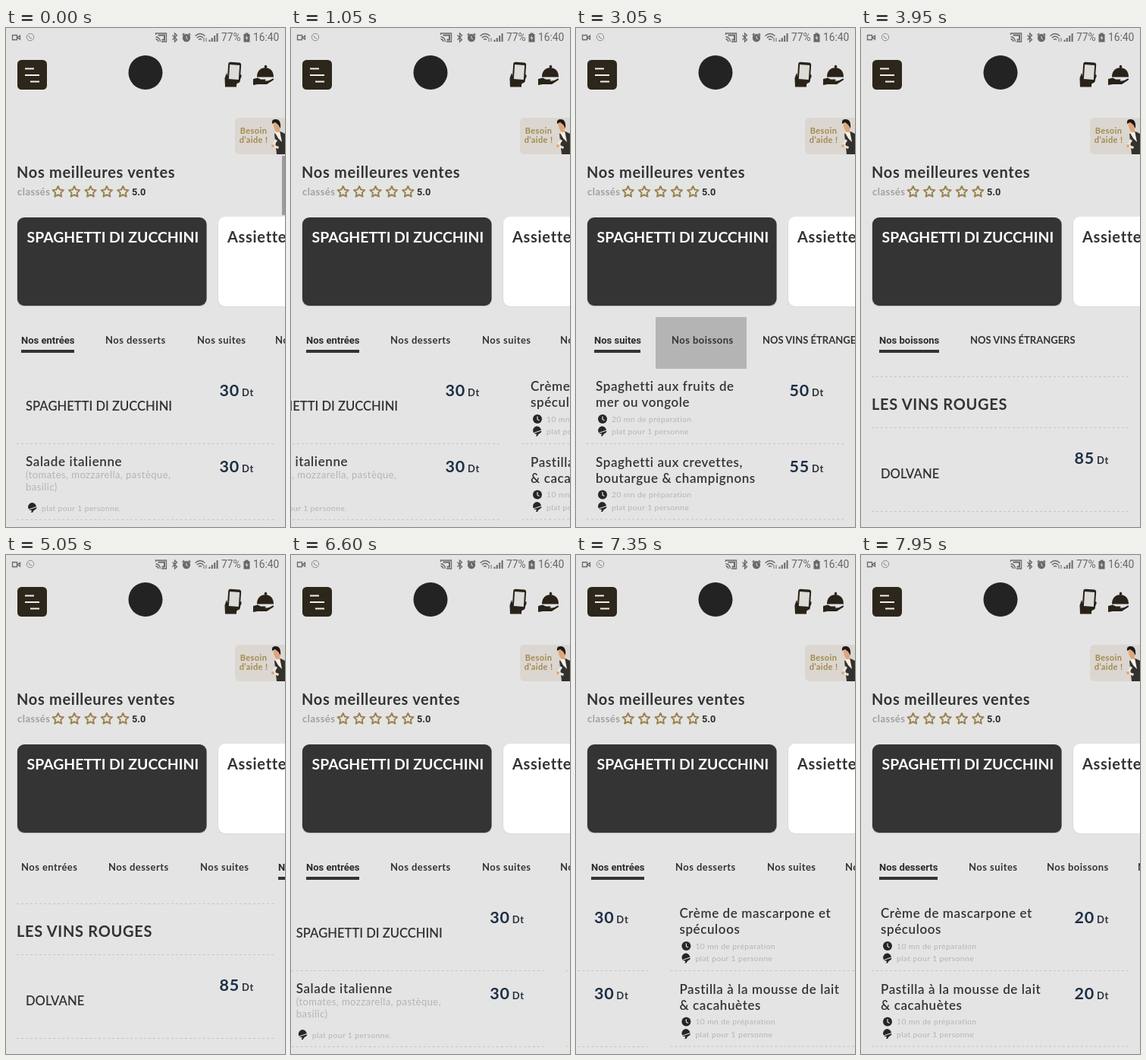
These frames come from a looping animation (368x656 px, 8 s). An HTML page:

```html
<!DOCTYPE html>
<html lang="fr">
<head>
<meta charset="utf-8">
<title>Menu du restaurant</title>
<style>
html, body { margin: 0; width: 100%; height: 100%; overflow: hidden; background: #e4e4e4; }
svg { display: block; width: 368px; height: 656px; }
text { font-family: Lato, "Open Sans", sans-serif; font-weight: 600; letter-spacing: .035em; fill: #333; }
.bold { font-weight: 700; }
.caps { letter-spacing: 0; }
.sys { font-family: Roboto, sans-serif; font-weight: 400; letter-spacing: 0; fill: #666; }
.on { font-family: Roboto, sans-serif; font-weight: 700; letter-spacing: 0; fill: #2b2b2b; }
.soft { fill: #b4b4b4; font-weight: 400; }
.price { fill: #1c2f45; font-weight: 700; }
.unit { fill: #2c333c; }
.gold { fill: #a08a50; font-weight: 700; }
.white { fill: #fff; }
.dash { stroke: #c5c5c5; stroke-dasharray: 3 3; }

#bar, #strip, #pages, .set, .ripple { animation: 8s linear infinite; }
#bar { animation-name: bar; }
#strip { animation-name: strip; }
#pages { animation-name: pages; }
.set { animation-timing-function: step-end; visibility: hidden; }
#set0 { animation-name: set0; }
#set1 { animation-name: set1; }
#set2 { animation-name: set2; }
#set3 { animation-name: set3; }
.ripple { transform-box: fill-box; transform-origin: center; opacity: 0; }
#press3 { animation-name: press3; }
#press0 { animation-name: press0; }

@keyframes bar { 0%, .625% { opacity: 1; } 6.875%, 100% { opacity: 0; } }
@keyframes strip {
  0%, 15.625% { transform: translateX(20px); animation-timing-function: ease-out; }
  18.125%, 27.5% { transform: translateX(-91px); animation-timing-function: ease-out; }
  30.625%, 40.625% { transform: translateX(-212px); animation-timing-function: ease-out; }
  43.75%, 54.8% { transform: translateX(-315px); animation-timing-function: ease-out; }
  59.375%, 93.125% { transform: translateX(20px); animation-timing-function: ease-out; }
  96.875%, 100% { transform: translateX(-91px); }
}
@keyframes pages {
  0%, 11.5% { transform: translateX(0); }
  12.5% { transform: translateX(-24px); }
  13.75% { transform: translateX(-130px); }
  15% { transform: translateX(-265px); }
  16.25% { transform: translateX(-342px); }
  17.5%, 20.7% { transform: translateX(-368px); }
  23.75% { transform: translateX(-440px); }
  25.625% { transform: translateX(-550px); }
  27.5% { transform: translateX(-680px); }
  29.6%, 39.8% { transform: translateX(-736px); animation-timing-function: ease-out; }
  43.75%, 70% { transform: translateX(-1104px); animation-timing-function: ease-in-out; }
  74.6%, 80.3% { transform: translateX(0); }
  82.5% { transform: translateX(-19px); }
  87.5% { transform: translateX(-125px); }
  90.625% { transform: translateX(-200px); animation-timing-function: ease-out; }
  96.25%, 100% { transform: translateX(-368px); }
}
@keyframes set0 {
  0% { visibility: visible; } 15.625% { visibility: hidden; }
  70% { visibility: visible; } 93.125%, 100% { visibility: hidden; }
}
@keyframes set1 {
  0% { visibility: hidden; } 15.625% { visibility: visible; }
  27.5% { visibility: hidden; } 93.125%, 100% { visibility: visible; }
}
@keyframes set2 {
  0% { visibility: hidden; } 27.5% { visibility: visible; } 40.625%, 100% { visibility: hidden; }
}
@keyframes set3 {
  0% { visibility: hidden; } 40.625% { visibility: visible; } 70%, 100% { visibility: hidden; }
}
@keyframes press3 {
  0%, 33.5% { opacity: 0; transform: scale(.15); }
  34% { opacity: .21; transform: scale(.2); }
  37.5%, 40% { opacity: .21; transform: scale(1); }
  42.5%, 100% { opacity: 0; transform: scale(1); }
}
@keyframes press0 {
  0%, 65.6% { opacity: 0; transform: scale(.15); }
  66% { opacity: .21; transform: scale(.2); }
  69%, 70% { opacity: .21; transform: scale(1); }
  72.5%, 100% { opacity: 0; transform: scale(1); }
}
</style>
</head>
<body>
<svg viewBox="0 0 368 656">
  <defs>
    <clipPath id="cell3"><rect x="317" y="380" width="120" height="68"/></clipPath>
    <clipPath id="cell0"><rect x="-20" y="380" width="114" height="68"/></clipPath>
    <g id="clock">
      <circle r="6" fill="#262626"/>
      <path d="M0-3.5V.5L2.6 2" fill="none" stroke="#e4e4e4" stroke-width="1.2"/>
    </g>
    <g id="dish" fill="#262626">
      <path d="M-5.500 .500A5.300 5.300 0 0 1 4.500-3.500L5-2L-5 1.500Z"/>
      <path d="M-5 2.500L5.500-1L5 1L1.500 3.500L0 6H-2L-1 3.200Z"/>
      <circle cx="-1.500" cy="-5.200" r="1"/>
    </g>
  </defs>
  <rect width="368" height="656" fill="#e4e4e4"/>

  <!-- status bar -->
  <g fill="none" stroke="#696969" stroke-width="1.3">
    <path d="M8.500 9.500h6v6h-6zM15 12.500l3.500-2.500v5z"/>
    <circle cx="32" cy="12" r="4.700" stroke-width=".7"/>
    <path d="M30 10q0 3 4 4" stroke-width=".8"/>
    <path d="M197.500 9V7H211.500V18H205M197.500 11.500a7 7 0 0 1 6 6.500M197.500 14.500a4 4 0 0 1 3.500 3.500"/>
    <path d="M200.500 9.500h8.500v6h-3.500" stroke-width="2"/>
    <path d="M219.500 9.500L225.500 15.500L222.500 18V7L225.500 9.500L219.500 15.500"/>
    <circle cx="238" cy="13" r="4.500" fill="#696969"/>
    <path d="M232.800 9.500L235 7.200M243.200 9.500L241 7.200" stroke-width="1.800"/>
    <path d="M238 10.500V13.500L240 14.500" stroke="#e4e4e4" stroke-width="1"/>
    <path d="M249.500 10.500Q256 4.500 262.500 10.500M251.800 13Q256 9 260.200 13M254 15.500Q256 13.500 258 15.500"/>
    <path d="M261 18v-5M264 13v5" stroke-width="1"/>
    <path d="M268.500 18v-2.500M271.800 18v-5M275.200 18v-8M278.600 18V7" stroke-width="2"/>
  </g>
  <path d="M313.500 8h2V6.500h4V8h2v10.500h-8z" fill="#666"/>
  <path d="M318 9.500l-2.500 4h2l-.500 3 2.500-4h-2z" fill="#e4e4e4"/>
  <text class="sys" x="284" y="17" font-size="13.800">77%</text>
  <text class="sys" x="326" y="17" font-size="13.800">16:40</text>

  <!-- header -->
  <rect x="15" y="42" width="39" height="39" rx="5.500" fill="#2d261a"/>
  <path d="M25 53.500H37M25 62H44M32 70.500H44" stroke="#f1efe9" stroke-width="1.800"/>
  <circle cx="184" cy="58.500" r="22.500" fill="#232323"/>
  <g fill="#292219">
    <path d="M288.500 66L291 59L294 69L303 72L309 61Q311 61 310.500 64L308 70L304 74V77.500H289Z"/>
    <g transform="rotate(4 301 58)">
      <rect x="292.500" y="45" width="17" height="27" rx="3"/>
      <rect x="294.500" y="48.500" width="13" height="19" fill="#dddcd9"/>
    </g>
    <path d="M331 64.500C331 56 336 52.500 341.500 52.300a1.800 1.800 0 1 1 2 0C349 53 353 57 353 64.500Z"/>
    <path d="M326 67L332 65.500L336 67.500H342Q343.500 69 341 70L347 69L352 66.500Q354 67 352.500 68.500L344 74H332L326 75Z"/>
  </g>

  <!-- help tag -->
  <rect x="302" y="118" width="74" height="48" rx="6" fill="#dcd6d0"/>
  <text class="gold" x="326.500" y="139" font-size="11" text-anchor="middle">Besoin</text>
  <text class="gold" x="326.500" y="150.500" font-size="11" text-anchor="middle">d’aide !</text>
  <path d="M354 139L362 136L368 139V166H357Z" fill="#34312c"/>
  <path d="M355 138L361 135L364 150L359 145Z" fill="#f4f0e8"/>
  <path d="M352.500 126Q358 122 361 127L361 137L357 137Q353 133 352.500 126Z" fill="#dfa67c"/>
  <path d="M351 126Q350 119 356 120Q363 120 362 132L359 127L355 124Z" fill="#1d1b19"/>
  <path d="M355 146L350 155L359 159L360 156L354 154L358 148Z" fill="#ece6da"/>
  <circle cx="352" cy="155" r="2" fill="#dfa67c"/>
  <rect id="bar" x="364" y="168" width="4" height="78" fill="#9b9b9b"/>

  <!-- best sellers -->
  <text class="bold" x="14" y="197" font-size="20">Nos meilleures ventes</text>
  <text class="bold" x="15" y="220" font-size="13" style="fill:#a0a0a0">classés</text>
  <g id="stars" fill="none" stroke="#98824c" stroke-width="1.900" stroke-linejoin="round"></g>
  <text class="on" x="166" y="220" font-size="12.700">5.0</text>
  <rect x="14.500" y="249.500" width="250.500" height="116.500" rx="9" fill="#bdbdbd"/>
  <rect x="15" y="249" width="249.500" height="116" rx="9" fill="#343434"/>
  <text class="bold caps white" x="27.500" y="282" font-size="19.400">SPAGHETTI DI ZUCCHINI</text>
  <rect x="279.500" y="249" width="110" height="117.500" rx="9" fill="#cfcfcf"/>
  <rect x="280" y="248" width="110" height="118" rx="9" fill="#fff"/>
  <text class="bold" x="292" y="282" font-size="20">Assiette</text>

  <g id="strip">
    <g clip-path="url(#cell3)"><circle id="press3" class="ripple" cx="377" cy="414" r="72"/></g>
    <g clip-path="url(#cell0)"><circle id="press0" class="ripple" cx="37" cy="414" r="70"/></g>
  </g>
  <g id="pages"></g>
</svg>
<script>
const $ = id => document.getElementById(id);
const text = (x, y, size, str, cls = '') =>
  `<text x="${x}" y="${y}" font-size="${size}" class="${cls}">${str}</text>`;
const dash = y => `<path class="dash" d="M14 ${y}H355"/>`;
const price = (y, n) =>
  `<text class="price" x="281.5" y="${y}" font-size="21.5">${n}<tspan class="unit" dx="3" font-size="13">Dt</tspan></text>`;
const note = (y, icon, str) =>
  `<use href="#${icon}" x="35" y="${y}"/>` + text(47, y + 3.5, 10.4, str, 'soft');
const caps = (y, str) => text(26, y, 16.6, str, 'caps');

// Star rating
const star = cx => Array.from({ length: 10 }, (_, i) => {
  const r = i % 2 ? 3.7 : 7.6, a = i * Math.PI / 5;
  return `${cx + r * Math.sin(a)},${215.5 - r * Math.cos(a)}`;
}).join(' ');
$('stars').innerHTML = [0, 1, 2, 3, 4]
  .map(i => `<polygon points="${star(68.7 + i * 21.4)}"/>`).join('');

// One tab row per active tab: label, width when idle, width when active
const tabs = [
  ['Nos entrées', 74, 70], ['Nos desserts', 80, 77], ['Nos suites', 62, 61],
  ['Nos boissons', 79, 79], ['NOS VINS ÉTRANGERS', 150, 150]
];
const gap = 41;
const tabRow = active => {
  let x = 0;
  const row = tabs.map(([label, idle, wide], i) => {
    const on = i === active, w = on ? wide : idle;
    const cls = on ? 'on' : i === 4 ? 'bold caps' : 'bold';
    const out = text(x, 415, 13, label, cls) +
      (on ? `<rect x="${x}" y="423" width="${w}" height="4" fill="#333"/>` : '');
    x += w + gap;
    return out;
  });
  return `<g class="set" id="set${active}">${row.join('')}</g>`;
};
$('strip').insertAdjacentHTML('beforeend', [0, 1, 2, 3].map(tabRow).join(''));

// Menu pages
const dishRow = (y, lines, cost, time) =>
  text(26, y + 1, 17, lines[0]) + text(26, y + 22, 17, lines[1]) + price(y + 8, cost) +
  note(y + 38, 'clock', `${time} mn de préparation`) +
  note(y + 54.5, 'dish', 'plat pour 1 personne') + dash(y + 70.5);
const pages = [
  caps(503, 'SPAGHETTI DI ZUCCHINI') + price(484, 30) + dash(546.5) +
    text(26, 575.5, 17, 'Salade italienne') + price(583.5, 30) +
    text(26, 592, 13, '(tomates, mozzarella, pastèque,', 'soft') +
    text(26, 608, 13, 'basilic)', 'soft') +
    note(631, 'dish', 'plat pour 1 personne.') + dash(646.5),
  dishRow(476, ['Crème de mascarpone et', 'spéculoos'], 20, 10) +
    dishRow(575.5, ['Pastilla à la mousse de lait', '&amp; cacahuètes'], 20, 10),
  dishRow(476, ['Spaghetti aux fruits de', 'mer ou vongole'], 50, 20) +
    dishRow(575.5, ['Spaghetti aux crevettes,', 'boutargue &amp; champignons'], 55, 20),
  dash(458.5) + text(14, 501.5, 20, 'LES VINS ROUGES', 'bold') + dash(525.5) +
    caps(591.5, 'DOLVANE') + price(572.5, 85) + dash(635.5)
];
$('pages').innerHTML = pages
  .map((p, i) => `<g transform="translate(${368 * i})">${p}</g>`).join('');
</script>
</body>
</html>
```
